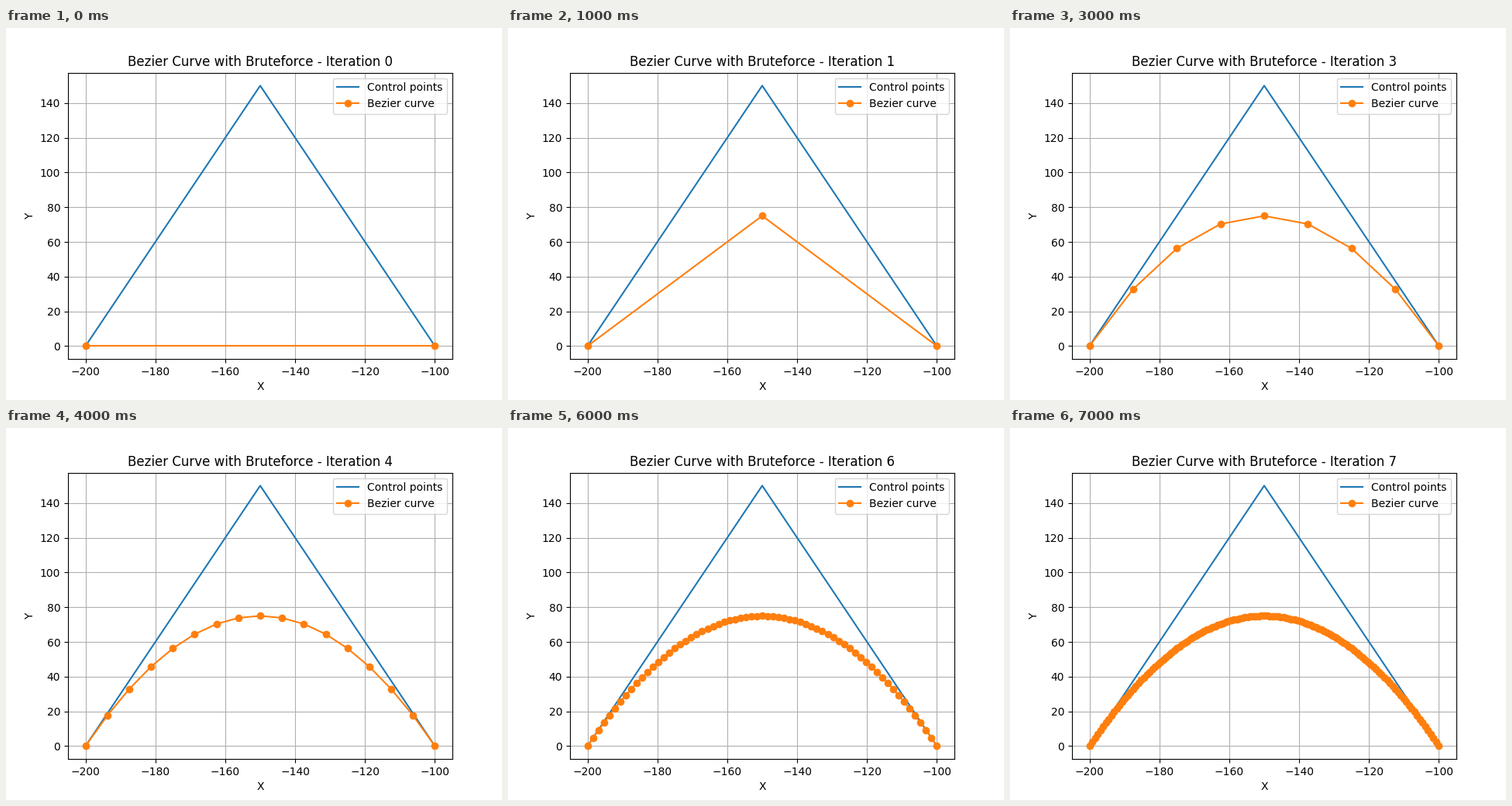
These frames come from a looping animation (640x480 px, 8000 ms). A matplotlib script:

```python
import numpy as np
import matplotlib.pyplot as plt
from matplotlib.animation import FuncAnimation

CONTROL = np.array([(-200, 0), (-150, 150), (-100, 0)], dtype=float)
ITERATIONS = 8


def bezier(iteration):
    """Sample the quadratic curve at 2**iteration equal steps of t."""
    t = np.linspace(0, 1, 2**iteration + 1)[:, None]
    p0, p1, p2 = CONTROL
    return (1 - t)**2 * p0 + 2 * t * (1 - t) * p1 + t**2 * p2


fig, ax = plt.subplots(figsize=(6.4, 4.8), dpi=100)
ax.plot(*CONTROL.T, label="Control points")
curve, = ax.plot(*bezier(0).T, marker="o", label="Bezier curve")
title = ax.set_title("")
ax.set_xlabel("X")
ax.set_ylabel("Y")
ax.legend(loc="upper right")
ax.grid(True)


def update(iteration):
    curve.set_data(*bezier(iteration).T)
    title.set_text(f"Bezier Curve with Bruteforce - Iteration {iteration}")
    return curve, title


anim = FuncAnimation(fig, update, frames=ITERATIONS, interval=1000,
                     init_func=lambda: update(0), repeat=True, repeat_delay=0)
plt.show()
```
